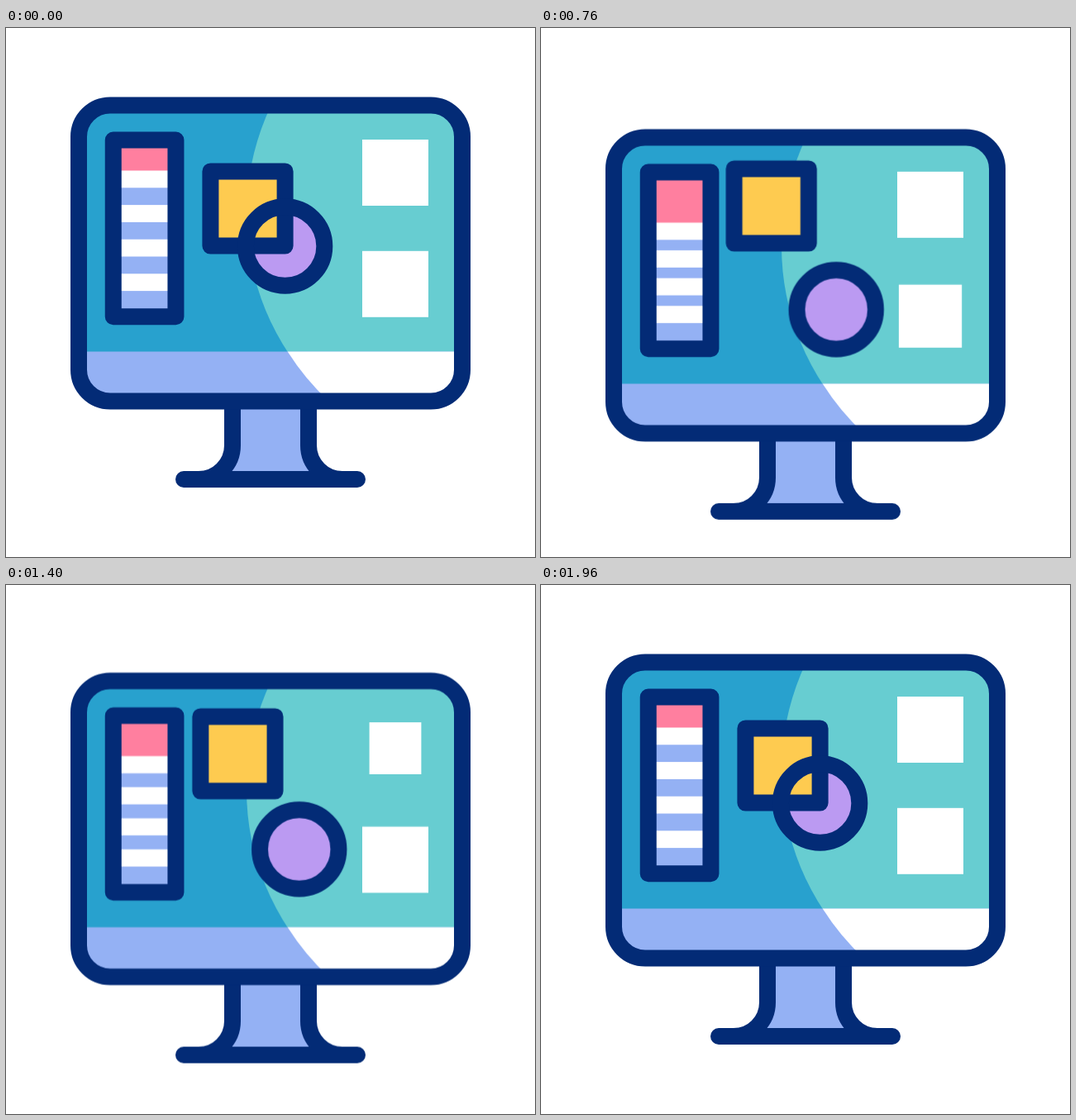
Animation of 640 by 640 pixels, one loop 2 s. Source, as an HTML page without scripts:

```html
<!DOCTYPE html>
<html lang="en">
<head>
<meta charset="utf-8">
<title>Design monitor</title>
<style>
  html, body { margin: 0; width: 100%; height: 100%; overflow: hidden; background: #fff; }
  svg { display: block; width: 100%; height: 100%; }
  .line { fill: none; stroke: #032b76; stroke-width: 20; stroke-linejoin: round; stroke-linecap: round; }
  .lilac { fill: #94b1f4; }
  .white { fill: #fff; }

  .body, .slide, .shift, .tile {
    animation: 2s cubic-bezier(.5, 0, .5, 1) infinite;
  }
  .body { animation-name: bob; }
  .slide { animation-name: slide; }
  .shift { animation-name: shift; }
  .tile { transform-box: fill-box; transform-origin: center; }
  .upper { animation-name: pulse-upper; }
  .lower { animation-name: pulse-lower; }

  .box { --x: -13.8px; --y: -42px; }
  .disc { --x: 19.6px; --y: 37.8px; }

  @keyframes bob {
    0%, 3.75%, 92.1%, 100% { transform: translateY(0); }
    45.75%, 50.1% { transform: translateY(41px); }
  }
  @keyframes slide {
    0%, 7.5%, 88.1%, 100% { transform: translateY(0); }
    43.5%, 51.1% { transform: translateY(var(--d)); }
  }
  @keyframes shift {
    0%, 12.25%, 89.1%, 100% { transform: translate(0, 0); }
    38.25%, 63.1% { transform: translate(var(--x), var(--y)); }
  }
  @keyframes pulse-lower {
    0%, 2%, 48%, 100% { transform: scale(1); }
    18%, 19% { transform: scale(.783); }
  }
  @keyframes pulse-upper {
    0%, 53.5%, 99%, 100% { transform: scale(1); }
    69.5%, 70% { transform: scale(.785); }
  }
</style>
</head>
<body>
<svg viewBox="0 0 640 640">
  <defs>
    <clipPath id="screen"><rect x="88" y="93.5" width="464" height="358" rx="38"/></clipPath>
    <clipPath id="panel"><rect x="130" y="136" width="75" height="213"/></clipPath>
  </defs>
  <g class="body">
    <!-- stand -->
    <path class="lilac" d="M274 452V505a41 41 0 0 1-41 41H407a41 41 0 0 1-41-41V452z"/>
    <path class="line" d="M274 452V505a41 41 0 0 1-41 41M366 452V505a41 41 0 0 0 41 41M215 546H425"/>

    <!-- screen -->
    <g clip-path="url(#screen)">
      <rect x="88" y="93" width="464" height="299" fill="#28a1ce"/>
      <circle cx="596" cy="225" r="305" fill="#67cdd1"/>
      <rect class="lilac" x="88" y="391.5" width="464" height="61"/>
      <path class="white" d="M340.7 391.5A305 305 0 0 0 391 452H552V391.5z"/>
    </g>
    <rect class="line" x="88" y="93.5" width="464" height="358" rx="38"/>

    <!-- layer panel -->
    <g clip-path="url(#panel)">
      <rect class="lilac" x="130" y="136" width="75" height="213"/>
      <rect class="white" x="130" y="297.3" width="75" height="20.8"/>
      <rect class="white slide" style="--d:8.3px" x="130" y="255.7" width="75" height="20.8"/>
      <rect class="white slide" style="--d:16.6px" x="130" y="214.1" width="75" height="20.8"/>
      <g class="slide" style="--d:25px">
        <rect x="130" y="100" width="75" height="74" fill="#ff7f9f"/>
        <rect class="white" x="130" y="172.5" width="75" height="20.8"/>
      </g>
    </g>
    <rect class="line" x="129.75" y="135.5" width="75.7" height="213.7"/>

    <!-- tiles -->
    <rect class="white tile upper" x="431" y="135" width="80" height="80"/>
    <rect class="white tile lower" x="431" y="269.8" width="80" height="80"/>

    <!-- square and circle -->
    <circle class="shift disc" cx="337.6" cy="264" r="47.7" fill="#bb9af2"/>
    <g class="shift box">
      <rect x="247.4" y="173.4" width="90.2" height="90.2" fill="#fecb50"/>
      <rect class="line" x="247.4" y="173.4" width="90.2" height="90.2"/>
    </g>
    <circle class="line shift disc" cx="337.6" cy="264" r="47.7"/>
  </g>
</svg>
</body>
</html>
```
